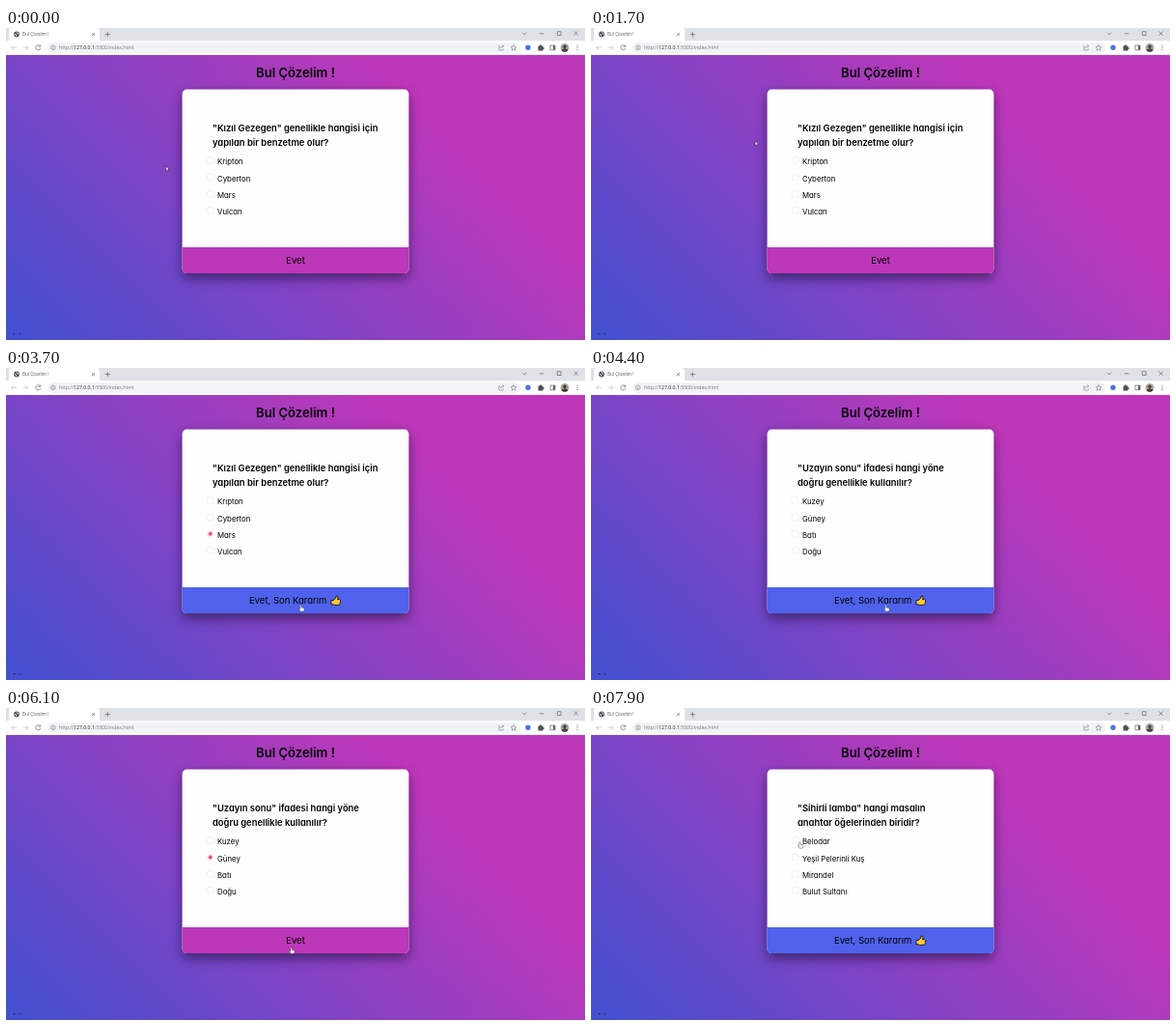
Animation of 600 by 323 pixels, one loop 8 s. Source, as an HTML page:

```html
<!DOCTYPE html>
<html lang="tr">
<head>
<meta charset="utf-8">
<title>Bul Çözelim !</title>
<style>
  html, body { margin: 0; width: 100%; height: 100%; overflow: hidden; }
  svg { display: block; width: 100vw; height: 100vh; font-family: Inter, "Open Sans", sans-serif; }
  text { font-feature-settings: "cv11"; } /* round, single-storey a */
  .chrome-text { font-family: "Open Sans", "Noto Sans", sans-serif; }
  .line { fill: none; stroke: #5f6368; stroke-width: .7; }
  .thin { stroke-width: .5; }
  .pale { stroke: #bfc2c6; }
  .heading { font-weight: 600; font-size: 13.1px; text-anchor: middle; }
  .question { font-weight: 600; font-size: 9.4px; }
  .option { font-size: 7.8px; }
  .action { font-size: 9.5px; }
  .radio { fill: #fff; stroke: #e9e6f3; stroke-width: .6; }
</style>
</head>
<body>
<svg id="stage" viewBox="0 0 600 323" preserveAspectRatio="none">
  <defs>
    <linearGradient id="sky" gradientUnits="userSpaceOnUse" x1="76.25" y1="399.25" x2="523.75" y2="-48.25">
      <stop offset="0" stop-color="#4150d0"/>
      <stop offset=".75" stop-color="#bd37b9"/>
    </linearGradient>
    <filter id="soft" x="-20%" y="-20%" width="140%" height="150%">
      <feGaussianBlur stdDeviation="6"/>
    </filter>
    <clipPath id="cardClip"><rect x="182.6" y="63.6" width="234.8" height="190.4" rx="4.5"/></clipPath>
    <clipPath id="faceClip"><circle cx="579" cy="20.3" r="4.4"/></clipPath>
  </defs>

  <rect y="27" width="600" height="296" fill="url(#sky)"/>

  <!-- browser window -->
  <rect width="600" height="14" fill="#dee1e6"/>
  <path d="M1 14q2 0 2-2V3q0-3 3-3h88q3 0 3 3v9q0 2 2 2z" fill="#fff"/>
  <rect y="13.2" width="600" height="14.7" fill="#fff"/>
  <rect x="43" y="15" width="490" height="11" rx="5.5" fill="#f1f3f4"/>
  <circle cx="11" cy="6.5" r="2.9" fill="#4d5156"/>
  <path d="M8.7 6.3l1.7.6.4 1.7M11.2 4.4l.4 1.1 1.7.8" fill="none" stroke="#fff" stroke-width=".8"/>
  <text class="chrome-text" x="17" y="8.4" font-size="4.6" fill="#55585c">Bul Çözelim !</text>
  <path class="line" d="M88.8 5l3.2 3.2m0-3.2l-3.2 3.2M102.8 6.6h5m-2.5-2.5v5"/>
  <path class="line" d="M535.2 4.9l2 2 2-2M552.8 5.8h4.4M571.3 3.7h3.8v3.8h-3.8zM588.6 3.6l4 4m0-4l-4 4"/>
  <path class="line pale" d="M11 20.3H5.6m2.4-2.4l-2.4 2.4 2.4 2.4M17.5 20.3h5.4m-2.4-2.4l2.4 2.4-2.4 2.4"/>
  <path class="line" d="M35.2 18.7a2.5 2.5 0 1 0 .5 2.3M35.7 17.4v1.9h-2"/>
  <circle class="line thin" cx="48.8" cy="20.3" r="2.3"/>
  <path class="line" d="M48.8 20v1.5M48.8 18.8v.6"/>
  <text class="chrome-text" x="55" y="22.2" font-size="5.15" fill="#74787d">http://<tspan fill="#292b2e">127.0.0.1</tspan>:5500/index.html</text>
  <path class="line thin" d="M512 18.9h-1.2v4h4.6v-1.3M512.4 21q.3-2.3 3.2-2.3m-1.3-1.4l1.5 1.4-1.5 1.4"/>
  <path class="line thin" d="M526 17.4l.9 1.9 2 .3-1.5 1.4.4 2.1-1.8-1-1.8 1 .4-2.1-1.5-1.4 2-.3z"/>
  <circle cx="541" cy="20.3" r="2.7" fill="#4b75dc"/>
  <path d="M551.5 18.6h1.5q0-1.4 1-1.4t1 1.4h1.5v1.5q1.3 0 1.3 1t-1.3 1v1.3h-5z" fill="#4d5156"/>
  <path class="line" d="M564 18h5v4.7h-5z"/>
  <path d="M567 18h2v4.7h-2z" fill="#5f6368"/>
  <g clip-path="url(#faceClip)">
    <rect x="574" y="15" width="10" height="11" fill="#a9a49c"/>
    <circle cx="579" cy="19.2" r="1.7" fill="#463d3b"/>
    <ellipse cx="579" cy="24.4" rx="3.5" ry="3.1" fill="#463d3b"/>
  </g>
  <g fill="#5f6368"><circle cx="592" cy="18" r=".6"/><circle cx="592" cy="20.3" r=".6"/><circle cx="592" cy="22.6" r=".6"/></g>

  <!-- quiz card -->
  <text class="heading" x="300" y="50.5">Bul Çözelim !</text>
  <rect x="183" y="68" width="234" height="191" rx="5" fill="#14082a" opacity=".6" filter="url(#soft)"/>
  <g clip-path="url(#cardClip)">
    <rect x="182" y="63" width="236" height="192" fill="#fefefe"/>
    <rect id="button" x="182" y="227" width="236" height="28"/>
  </g>
  <g id="quiz"></g>
  <text id="idle" class="action" x="300" y="244" text-anchor="middle">Evet</text>
  <g id="active">
    <text class="action" x="252" y="244">Evet, Son Kararım</text>
    <path d="M337 240.4h2.5l2.2-2.2.4-2.2q1.7-.5 1.9 1.3l-.4 2.3h2.2q1.3.6.5 1.7.8.8-.1 1.6.4.9-.5 1.4.1 1-1 1h-4.3l-1.2-.5H337z" fill="#ffc938" stroke="#111" stroke-width=".9" stroke-linejoin="round"/>
  </g>

  <g fill="#17143a"><rect id="speck" x="7.5" y="316.3" height="1"/><rect x="13.8" y="316.3" width="1" height="1"/></g>

  <!-- pointers, drawn from their tips -->
  <path id="arrow" d="M0 0v4.7l1.1-1 .8 1.7.9-.4-.8-1.7h1.5z" fill="#fff" stroke="#111" stroke-width=".5" stroke-linejoin="round"/>
  <path id="hand" d="M-.8.5q.8-1 1.5 0v2l2.2.5q.7.2.6 1L2.9 6.3H-.5L-2.2 4q.2-.9 1.4 0z" fill="#fff" stroke="#222" stroke-width=".4" stroke-linejoin="round"/>
</svg>

<script>
const LOOP = 8000, STEP = 100;

const QUIZ = [
  { from: 0, pick: 2, pickAt: 2700, ask: ['"Kızıl Gezegen" genellikle hangisi için', 'yapılan bir benzetme olur?'],
    options: ['Kripton', 'Cyberton', 'Mars', 'Vulcan'] },
  { from: 4000, pick: 1, pickAt: 5400, ask: ['"Uzayın sonu" ifadesi hangi yöne', 'doğru genellikle kullanılır?'],
    options: ['Kuzey', 'Güney', 'Batı', 'Doğu'] },
  { from: 6900, pick: 0, pickAt: LOOP, ask: ['"Sihirli lamba" hangi masalın', 'anahtar öğelerinden biridir?'],
    options: ['Belodar', 'Yeşil Pelerinli Kuş', 'Mirandel', 'Bulut Sultanı'] },
];

// time, x, y of the pointer tip
const PATH = [
  [0, 165.7, 143.2], [300, 160, 136], [800, 93, 46], [1000, 90.3, 41.8], [1300, 90.3, 41.8],
  [2000, 222, 166], [2400, 230.5, 172], [2900, 230.5, 172], [3500, 304, 244], [3700, 305.7, 245.6],
  [4600, 305.7, 245.6], [5200, 232, 155], [5600, 232, 155], [6100, 295.7, 248],
  [6400, 298, 243], [7200, 298, 243], [7900, 216.5, 138.8],
];

const HOVER = [[3400, 4900], [6200, LOOP]];
const HAND = [[2100, 3000], [3400, 4800], [5100, 5700], [6000, 7400], [7800, LOOP]];

const $ = id => document.getElementById(id);
const within = (spans, t) => spans.some(([a, b]) => t >= a && t < b);
const show = (node, on) => node.setAttribute('visibility', on ? 'visible' : 'hidden');

function add(parent, tag, attrs, text = '') {
  const node = document.createElementNS('http://www.w3.org/2000/svg', tag);
  for (const key in attrs) node.setAttribute(key, attrs[key]);
  node.textContent = text;
  return parent.appendChild(node);
}

for (const q of QUIZ) {
  q.group = add($('quiz'), 'g', {});
  q.ask.forEach((line, i) => add(q.group, 'text', { class: 'question', x: 214, y: 107 + i * 14.5 }, line));
  q.options.forEach((label, i) => {
    const y = 137.3 + i * 17.2;
    add(q.group, 'circle', { class: 'radio', cx: 211.7, cy: y, r: 3.7 });
    add(q.group, 'text', { class: 'option', x: 219, y: y + 4.1 }, label);
    if (i === q.pick) q.dot = add(q.group, 'circle', { cx: 211.8, cy: y, r: 2.1, fill: '#e5487f', stroke: '#f3a9c4', 'stroke-width': .8 });
  });
}

function pointerAt(t) {
  const i = PATH.findIndex(p => p[0] > t);
  if (i < 0) return PATH[PATH.length - 1].slice(1);
  const [t0, x0, y0] = PATH[i - 1], [t1, x1, y1] = PATH[i];
  const u = (t - t0) / (t1 - t0), k = u * u * (3 - 2 * u);
  return [x0 + (x1 - x0) * k, y0 + (y1 - y0) * k];
}

function draw(t) {
  QUIZ.forEach((q, i) => {
    const next = QUIZ[i + 1];
    const on = t >= q.from && (!next || t < next.from);
    show(q.group, on);
    show(q.dot, on && t >= q.pickAt);
  });

  const hover = within(HOVER, t);
  $('button').setAttribute('fill', hover ? '#5062eb' : '#bd37b9');
  show($('idle'), !hover);
  show($('active'), hover);
  $('speck').setAttribute('width', t < 2100 ? 1 : 2.2);

  const hand = within(HAND, t);
  const place = `translate(${pointerAt(t).join(' ')})`;
  for (const id of ['arrow', 'hand']) {
    $(id).setAttribute('transform', place);
    show($(id), (id === 'hand') === hand);
  }
}

const start = performance.now();
function tick() {
  const t = (performance.now() - start) % LOOP;
  draw(Math.floor(t / STEP) * STEP);
  requestAnimationFrame(tick);
}
tick();
</script>
</body>
</html>
```
